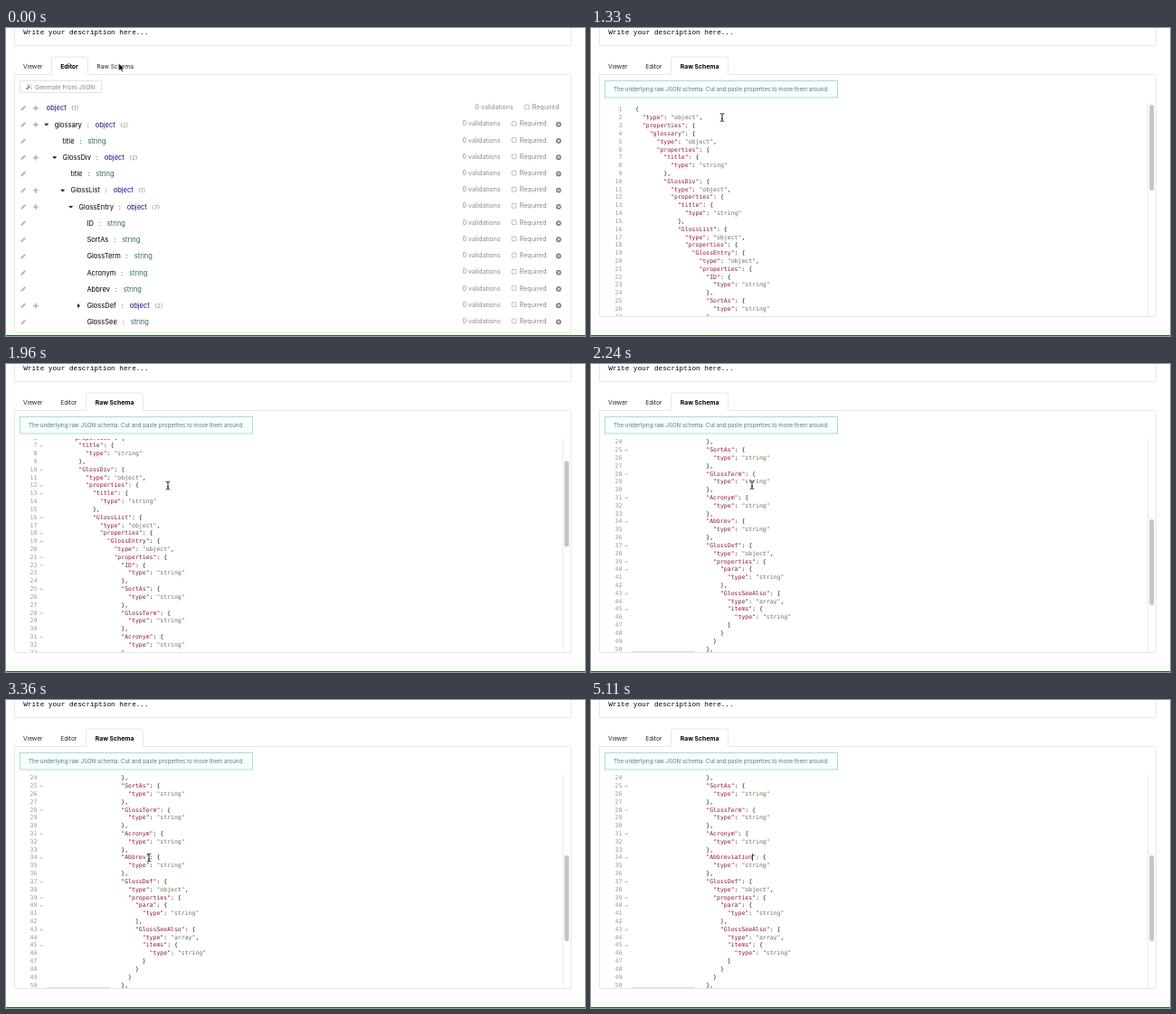
Recreate the animation shown at these times as an HTML page. Size 640 by 341 pixels, loop 5.18 s.

```html
<!DOCTYPE html>
<html lang="en">
<head>
<meta charset="utf-8">
<title>Schema editor</title>
<style>
html, body { margin: 0; width: 100%; height: 100%; overflow: hidden; background: #fff; }
svg { display: block; width: 640px; height: 341px; }
text { font-family: Inter, "Open Sans", sans-serif; white-space: pre; }
.code text { font: 6.5px "DejaVu Sans Mono", monospace; }
</style>
</head>
<body>
<svg id="stage" viewBox="0 0 640 341"></svg>
<script>
const NS = 'http://www.w3.org/2000/svg';
const LOOP = 5180, STEP = 70;
const stage = document.getElementById('stage');

function add(parent, tag, attrs = {}, text) {
  const el = document.createElementNS(NS, tag);
  for (const k in attrs) el.setAttribute(k, attrs[k]);
  if (text !== undefined) el.textContent = text;
  parent.appendChild(el);
  return el;
}
const group = (parent = stage, attrs) => add(parent, 'g', attrs);
const path = (parent, d, stroke, attrs) =>
  add(parent, 'path', { d, stroke, fill: 'none', 'stroke-width': 1, ...attrs });
const label = (parent, x, y, text, size, fill, attrs) =>
  add(parent, 'text', { x, y, 'font-size': size, fill, ...attrs }, text);
const show = (el, on) => el.setAttribute('visibility', on ? 'visible' : 'hidden');

const LINE = '#e8e8e8', MUTED = '#8a8a8a', ICON = '#b0b0b0';

// Page frame
path(stage, 'M9.5 0V19.5H624.5V0', LINE);
label(stage, 19.2, 7.4, 'Write your description here...', 7.7, '#000',
  { style: 'font-family:"Liberation Mono",monospace' });
add(stage, 'rect', { x: 0, y: 340, width: 640, height: 1, fill: '#087a08' });

// Tabs plus the panel outline below them
function panel(parent, left, right, bottom, active) {
  path(parent, `M9.5 51.5H${left}V34q0 -2 2 -2H${right - 2}q2 0 2 2V51.5H624.5V${bottom}H9.5Z`, LINE);
  [['Viewer', 19], ['Editor', 60.2], ['Raw Schema', 100.5]].forEach(([name, x]) => {
    const on = name === active;
    const shift = on && name === 'Raw Schema' ? -1.7 : 0;
    label(parent, x + shift, 45, name, on ? 6.8 : 6.6, on ? '#000' : '#222',
      { 'font-weight': on ? 700 : 400 });
  });
}

// Editor view
const editor = group();
panel(editor, 50.5, 90.5, 336.5, 'Editor');
add(editor, 'rect', { x: 15.5, y: 58.5, width: 90, height: 13, rx: 1, fill: '#fff', stroke: '#e2e2e2' });
path(editor, 'M22.6 68L26.6 64', '#666', { 'stroke-width': 1.2 });
path(editor, 'M24 62.2v1.6M23.2 63h1.6M27.8 65.8v1.4M27.1 66.5h1.4M27.6 62.2v1', '#666', { 'stroke-width': .5 });
label(editor, 32, 67.8, 'Generate From JSON', 6.6, '#808080');

// indent, fold state, name, type, child count
const rows = [
  [0, '', '', 'object', 1],
  [1, 'open', 'glossary', 'object', 2],
  [2, '', 'title', 'string'],
  [2, 'open', 'GlossDiv', 'object', 2],
  [3, '', 'title', 'string'],
  [3, 'open', 'GlossList', 'object', 1],
  [4, 'open', 'GlossEntry', 'object', 7],
  [5, '', 'ID', 'string'],
  [5, '', 'SortAs', 'string'],
  [5, '', 'GlossTerm', 'string'],
  [5, '', 'Acronym', 'string'],
  [5, '', 'Abbrev', 'string'],
  [5, 'shut', 'GlossDef', 'object', 2],
  [5, '', 'GlossSee', 'string']
];

function drawRow([depth, fold, name, type, count], i) {
  const y = 88.6 + i * 18.22, x = 44.7 + depth * 8.95;
  path(editor, `M16.6 ${y + 2.6}l.5 -1.6 3.4 -3.4 1.1 1.1 -3.4 3.4z`, ICON, { fill: ICON, 'stroke-width': .5 });
  if (count) path(editor, `M29.8 ${y + .2}h6M32.8 ${y - 2.8}v6`, ICON, { 'stroke-width': 1.4 });
  if (fold) {
    const d = fold === 'open' ? `M${x - 11.4} ${y - 1}h5l-2.5 2.7z` : `M${x - 10.3} ${y - 2.3}v5l2.7 -2.5z`;
    add(editor, 'path', { d, fill: '#111' });
  }
  const t = label(editor, x, y + 2.7, '', 7.5, '#000');
  if (name) {
    add(t, 'tspan', {}, name);
    add(t, 'tspan', { dx: 5.9 }, ':');
    add(t, 'tspan', { dx: 6.8, fill: type === 'object' ? '#101080' : '#2c6662' }, type);
  } else add(t, 'tspan', { fill: '#101080' }, type);
  if (count) add(t, 'tspan', { dx: 5.4, 'font-size': 6.4, fill: MUTED }, `{${count}}`);

  const r = i ? 504.6 : 518.6, c = y - 1;
  label(editor, r, c + 2.5, '0 validations', 7.05, MUTED);
  add(editor, 'rect', { x: r + 54.6, y: c - 2.4, width: 4.8, height: 4.8, rx: .8, fill: '#fff', stroke: '#a0a0a0', 'stroke-width': .7 });
  label(editor, r + 63.2, c + 2.5, 'Required', 7.05, MUTED);
  if (i) {
    add(editor, 'circle', { cx: 610.8, cy: c + .9, r: 2.9, fill: '#808080' });
    path(editor, `M609.6 ${c - .3}l2.4 2.4m0 -2.4l-2.4 2.4`, '#fff', { 'stroke-width': 1 });
  }
}
rows.forEach(drawRow);

// Raw schema view
const raw = group();
panel(raw, 88.5, 151.5, 319.5, 'Raw Schema');
add(raw, 'rect', { x: 15.5, y: 58.5, width: 257, height: 18.5, fill: '#f8fdfd', stroke: '#b0d8da' });
label(raw, 25, 70, 'The underlying raw JSON schema. Cut and paste properties to move them around.', 6.1, '#43828a');

const str = { type: 'string' };
const obj = properties => ({ type: 'object', properties });
const schema = obj({ glossary: obj({ title: str, GlossDiv: obj({ title: str, GlossList: obj({ GlossEntry: obj({
  ID: str, SortAs: str, GlossTerm: str, Acronym: str, Abbrev: str,
  GlossDef: obj({ para: str, GlossSeeAlso: { type: 'array', items: str } }),
  GlossSee: str
}) }) }) }) });

const CHAR = 3.913, LEAD = 8.82, LEFT = 49, EDIT = 33;
const clip = add(stage, 'clipPath', { id: 'view' });
add(clip, 'rect', { x: 10, y: 83, width: 605, height: 236 });
const view = group(raw, { 'clip-path': 'url(#view)' });
const code = group(view, { class: 'code' });
const folds = group(code);

function paint(t, line) {
  t.textContent = '';
  for (const [part] of line.trim().matchAll(/"[^"]*"(?=:)|"[^"]*"|[^"]+/g)) {
    const quoted = part[0] === '"';
    const key = quoted && line.includes(part + ':');
    add(t, 'tspan', { fill: key ? '#8e1836' : quoted ? '#6e7052' : '#222' }, part);
  }
}

const lines = JSON.stringify(schema, null, 2).split('\n');
const lineEls = lines.map((line, i) => {
  const y = 92.4 + i * LEAD;
  add(code, 'text', { x: 34.4, y, fill: '#999', 'text-anchor': 'end' }, i + 1);
  if (line.endsWith('{')) path(folds, `M37.7 ${y - 2.4}l1.5 1.5 1.5 -1.5`, '#888', { 'stroke-width': .7 });
  const t = add(code, 'text', { x: LEFT + line.search(/\S/) * CHAR, y });
  paint(t, line);
  return t;
});
lineEls[0].firstChild.setAttribute('fill', '#0a4a3a');
const caret = add(code, 'rect', { y: 86 + EDIT * LEAD, width: .8, height: 8, fill: '#111' });

path(raw, 'M615.5 83V319', '#ececec');
const thumb = add(raw, 'rect', { x: 617.3, width: 5, height: 95, rx: 2.5, fill: '#c4c4c4' });
const hbar = add(raw, 'rect', { x: 45, y: 318, width: 70, height: 1.5, fill: '#e0e0e0' });

// Pointers, each drawn around its own hot spot
const arrow = group();
path(arrow, 'M0 0V8.2L1.9 6.5 3.2 9.4 4.6 8.8 3.3 6H5.9Z', '#fff', { fill: '#000', 'stroke-width': .6 });
const hand = group();
path(hand, 'M-.9 .8Q0 -.6 .8 .8V3.4Q1.8 2.8 2.3 3.7 3.3 3.2 3.7 4.1 4.9 3.8 5 5V7L4 9.8H-.6L-3 6.2Q-2.8 4.9 -.9 6Z', '#111', { fill: '#fff', 'stroke-width': .8 });
path(hand, 'M.9 6.3V8.3M2.3 6.3V8.3', '#111', { 'stroke-width': .5 });
const beam = group();
path(beam, 'M-2.3 -4.4Q0 -4.4 0 -3.2Q0 -4.4 2.3 -4.4M0 -3.4V3.4M-2.3 4.4Q0 4.4 0 3.2Q0 4.4 2.3 4.4M-1 1.4H1', '#111', { 'stroke-width': .9 });

// Timeline: [time, ...values]
const OPEN = 980, HOVER = 350, IBEAM = 1260;
const moves = [
  [0, 124.8, 39.2], [280, 124.8, 39.2], [420, 123.4, 40.5], [1120, 123.4, 40.5], [1330, 145, 99],
  [1540, 166, 120], [1750, 179, 134.5], [1960, 179, 134.5], [2240, 178, 134], [2520, 178, 133],
  [2800, 172, 150], [3150, 158, 174.5], [LOOP, 158, 174.5]
];
const scrolls = [
  [0, 0], [1610, 0], [1750, 11], [1960, 53], [2030, 93], [2100, 138], [2170, 179], [2240, 207], [LOOP, 207]
];
const keys = [3850, 3990, 4130, 4270, 4340, 4550];
const CLICK = 3640;

function at(table, t) {
  const i = table.findIndex(row => row[0] > t);
  const a = table[i - 1], b = table[i];
  const k = (t - a[0]) / (b[0] - a[0]);
  return a.slice(1).map((v, n) => v + (b[n + 1] - v) * k);
}

let typed = 0;
function render(t) {
  const isRaw = t >= OPEN;
  show(editor, !isRaw);
  raw.style.display = isRaw ? '' : 'none';

  const [scroll] = at(scrolls, t);
  code.setAttribute('transform', `translate(0 ${-scroll})`);
  thumb.setAttribute('y', 85 + scroll * .42);
  show(folds, t >= 1470);
  show(hbar, t >= 2240);

  const count = keys.filter(k => k <= t).length;
  if (count !== typed) {
    paint(lineEls[EDIT], lines[EDIT].replace('Abbrev', 'Abbrev' + 'iation'.slice(0, count)));
    typed = count;
  }
  caret.setAttribute('x', LEFT + (27 + count) * CHAR);
  const last = keys[keys.length - 1];
  show(caret, t >= CLICK && (t < last || t < last + 280 || t >= last + 490));

  const [x, y] = at(moves, t);
  [[arrow, t < HOVER], [hand, t >= HOVER && t < IBEAM], [beam, t >= IBEAM && !count]].forEach(([el, on]) => {
    show(el, on);
    el.setAttribute('transform', `translate(${x} ${y})`);
  });
}

const start = performance.now();
function tick() {
  const t = (performance.now() - start) % LOOP;
  render(Math.floor(t / STEP) * STEP);
  requestAnimationFrame(tick);
}
render(0);
tick();
</script>
</body>
</html>
```
